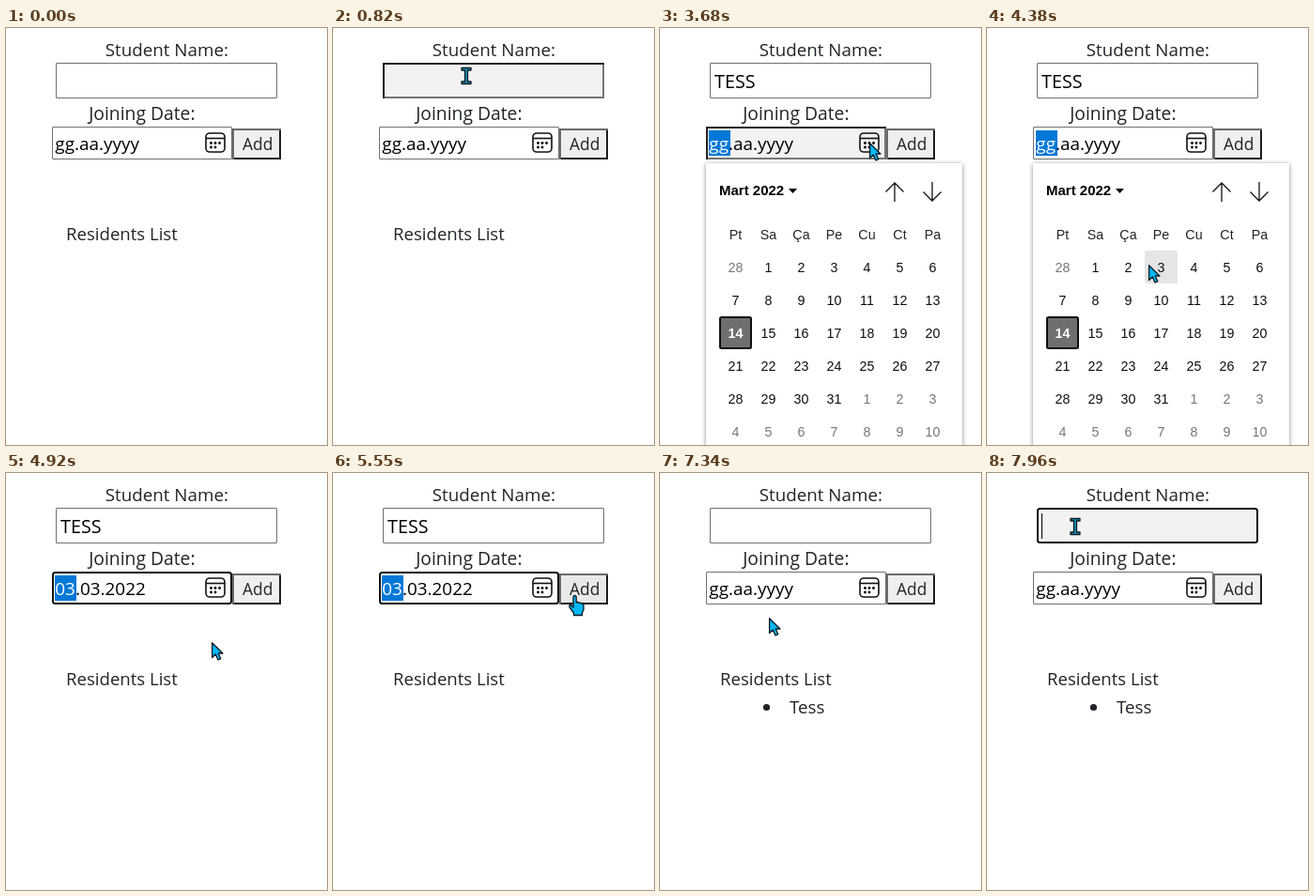
Animation of 342 by 444 pixels, one loop 8000 ms. Source, as an HTML page:

```html
<!DOCTYPE html>
<html lang="en">
<head>
<meta charset="utf-8">
<style>
  html, body { margin: 0; width: 100%; height: 100%; overflow: hidden; background: #fff; }
  svg { display: block; width: 342px; height: 444px; font-family: "Open Sans", "Noto Sans", sans-serif; }
  .cal { font-family: "Liberation Sans", Arial, sans-serif; text-anchor: middle; }
  .icon { fill: none; stroke: #111; }
</style>
</head>
<body>
<svg id="stage" viewBox="0 0 342 444"></svg>
<script>
const LOOP = 8000, STEP = 70;
const stage = document.getElementById('stage');
const NAME = { x: 53, y: 37, w: 236, h: 38 };
const DATE = { x: 49, y: 105, w: 192, h: 35 };
const ADD = { x: 241, y: 107, w: 52, h: 33 };

// Pointer stops: time, x, y
const path = [
  [330, 293, 344], [820, 142, 51], [2800, 142, 51], [3480, 223, 122],
  [3680, 223, 122], [4380, 172, 252], [4590, 172, 252], [5200, 238, 150],
  [5550, 258, 130], [6280, 258, 130], [6470, 206, 206], [7070, 137, 247],
  [7200, 137, 247], [7690, 94, 57], [LOOP, 94, 57]
];

const during = (t, ...spans) => spans.some(([a, b]) => t >= a && t < b);
const inside = (p, b) => p.x >= b.x && p.x < b.x + b.w && p.y >= b.y && p.y < b.y + b.h;
const text = (x, y, size, s, attrs = '') =>
  `<text x="${x}" y="${y}" font-size="${size}" fill="#212529" ${attrs}>${s}</text>`;
const rect = (x, y, w, h, fill, attrs = '') =>
  `<rect x="${x}" y="${y}" width="${w}" height="${h}" fill="${fill}" ${attrs}/>`;

function pointerAt(t) {
  const i = path.findIndex((k, n) => n < path.length - 1 && t >= k[0] && t < path[n + 1][0]);
  if (i < 0) return { x: -99, y: -99 };
  const [t0, x0, y0] = path[i], [t1, x1, y1] = path[i + 1];
  const p = Math.floor((t - t0) / STEP) * STEP / (t1 - t0);
  const e = p * (2 - p);
  return { x: Math.round(x0 + (x1 - x0) * e), y: Math.round(y0 + (y1 - y0) * e) };
}

// Two-tone border, 2px wide
function bevel({ x, y, w, h }, fill, light, dark) {
  const r = x + w - 1, b = y + h - 1;
  return rect(x, y, w, h, fill) +
    `<path d="M${r} ${y + 1}V${b}H${x}" fill="none" stroke="${dark}" stroke-width="2"/>` +
    `<path d="M${x + 1} ${b + 1}V${y + 1}H${r + 1}" fill="none" stroke="${light}" stroke-width="2"/>`;
}

function field(box, hover, focus) {
  const { x, y, w, h } = box, fill = hover ? '#f2f2f2' : '#fff';
  if (focus) return rect(x + 1, y + 1, w - 2, h - 2, fill, 'rx="2.5" stroke="#101010" stroke-width="2"');
  if (hover) return bevel(box, fill, '#222', '#767676');
  return rect(x + .5, y + .5, w - 1, h - 1, fill, 'rx=".5" stroke="#707070"');
}

function dateIcon() {
  const dots = [[218.5, 122.5], [223, 122.5], [227.5, 122.5], [218.5, 127], [223, 127]];
  return `<rect x="213" y="112" width="20" height="20" rx="4" class="icon" stroke-width="1.6"/>
    <path d="M213 117.5H233" class="icon" stroke-width="1.6"/>` +
    dots.map(([x, y]) => `<circle cx="${x}" cy="${y}" r="1.4"/>`).join('');
}

function calendar(p) {
  let s = rect(49, 144, 273, 310, '#fff', 'style="filter:drop-shadow(0 1px 2.5px #0007)"');
  s += '<g class="cal">' + text(63, 178, 15, 'Mart 2022', 'style="fill:#000;text-anchor:start" font-weight="bold"') +
    `<path d="M137 171h9l-4.5 5z"/>
     <path d="M250 185V165M240.5 174.5L250 165L259.5 174.5M290 164V184M280.5 174.5L290 184L299.5 174.5" class="icon" stroke-width="1.3"/>`;
  ['Pt', 'Sa', 'Ça', 'Pe', 'Cu', 'Ct', 'Pa'].forEach((d, c) => s += text(80.5 + 35 * c, 224.5, 14.3, d));
  for (let i = 0; i < 42; i++) {
    const x = 63 + i % 7 * 35, y = 237 + Math.floor(i / 7) * 35;
    const day = i < 1 ? 28 : i > 31 ? i - 31 : i;
    const today = i === 14, other = i < 1 || i > 31;
    if (today) s += rect(x + 1, y + 1, 33, 33, '#6f6f6f', 'rx="1.5" stroke="#101010" stroke-width="2"');
    else if (inside(p, { x, y, w: 35, h: 35 })) s += rect(x, y, 35, 35, '#e5e5e5', 'rx="2"');
    const ink = today ? '#fff' : other ? '#767676' : '#101010';
    s += text(x + 17.5, y + 23, 14.3, day, `style="fill:${ink}" ${today ? 'font-weight="bold"' : ''}`);
  }
  return s + '</g>';
}

function pointer(p, onName, onAdd) {
  let d = 'M.6 .8V16.5L4.3 13L7 19L9.8 17.7L7.2 12H12Z', fill = '#00b7f5';
  if (onName) {
    d = 'M-5 -8.5H5V-6H1.5V6H5V8.5H-5V6H-1.5V-6H-5Z';
    fill = '#1690b8';
  }
  if (onAdd) d = 'M-2 2Q-2 .5 -.5 .5T1.2 2V8Q3 6.8 4.2 8.4Q5.8 7.5 6.8 9.2Q9 8.8 9 11V15Q9 17 7.5 18.5V21.5H-1.5V19L-6 13Q-7 10.5 -4.5 10.5L-2 13Z';
  return `<path transform="translate(${p.x} ${p.y})" d="${d}" fill="${fill}" stroke="#0b1a22" stroke-width="1.3" stroke-linejoin="round"/>`;
}

function draw(t) {
  const p = pointerAt(t);
  const open = t >= 3680 && t < 4520;
  const onName = inside(p, NAME), onDate = inside(p, DATE), onAdd = inside(p, ADD);
  const nameFocus = during(t, [1020, 3610], [7890, LOOP]);
  const dateFocus = during(t, [3610, 3680], [4520, 5950]);
  const added = t >= 6020;
  const typed = added || t < 1890 ? '' : 'TESS'.slice(0, Math.floor((t - 1890) / 110) + 1);
  const [day, rest] = t >= 4450 && !added ? ['03', '.03.2022'] : ['gg', '.aa.yyyy'];
  const picked = during(t, [3610, 5950]);

  let s = text(105.8, 30, 18.8, 'Student Name:') + field(NAME, onName, nameFocus) +
    text(58, 64, 19.8, typed, 'id="typed" style="fill:#000"') +
    text(88.2, 98, 19.3, 'Joining Date:') + field(DATE, onDate, dateFocus);
  if (picked) s += rect(52, 109, 23, 27, '#0078d7');
  s += text(52.3, 130, 18.9, `<tspan fill="${picked ? '#fff' : '#000'}">${day}</tspan><tspan fill="#000">${rest}</tspan>`) +
    dateIcon() + bevel(ADD, onAdd ? '#e9e9e9' : '#efefef', '#6a6a6a', '#1c1c1c') +
    text(252, 130, 17.4, 'Add') + text(64, 226, 18.6, 'Residents List');
  if (added) s += '<circle cx="113.5" cy="249.5" r="3.6" fill="#212529"/>' + text(138, 256, 18.8, 'Tess');
  if (open) s += calendar(p);
  if (during(t, [1020, 1620], [1890, 2800], [3320, 3610], [7890, LOOP])) s += rect(58, 43, 1, 27, '#000', 'id="caret"');
  s += pointer(p, onName, onAdd);
  stage.innerHTML = s;

  const caret = document.getElementById('caret');
  if (caret && typed)
    caret.setAttribute('x', Math.round(58 + document.getElementById('typed').getComputedTextLength()));
}

function tick() {
  draw(performance.now() % LOOP);
  requestAnimationFrame(tick);
}
tick();
</script>
</body>
</html>
```
